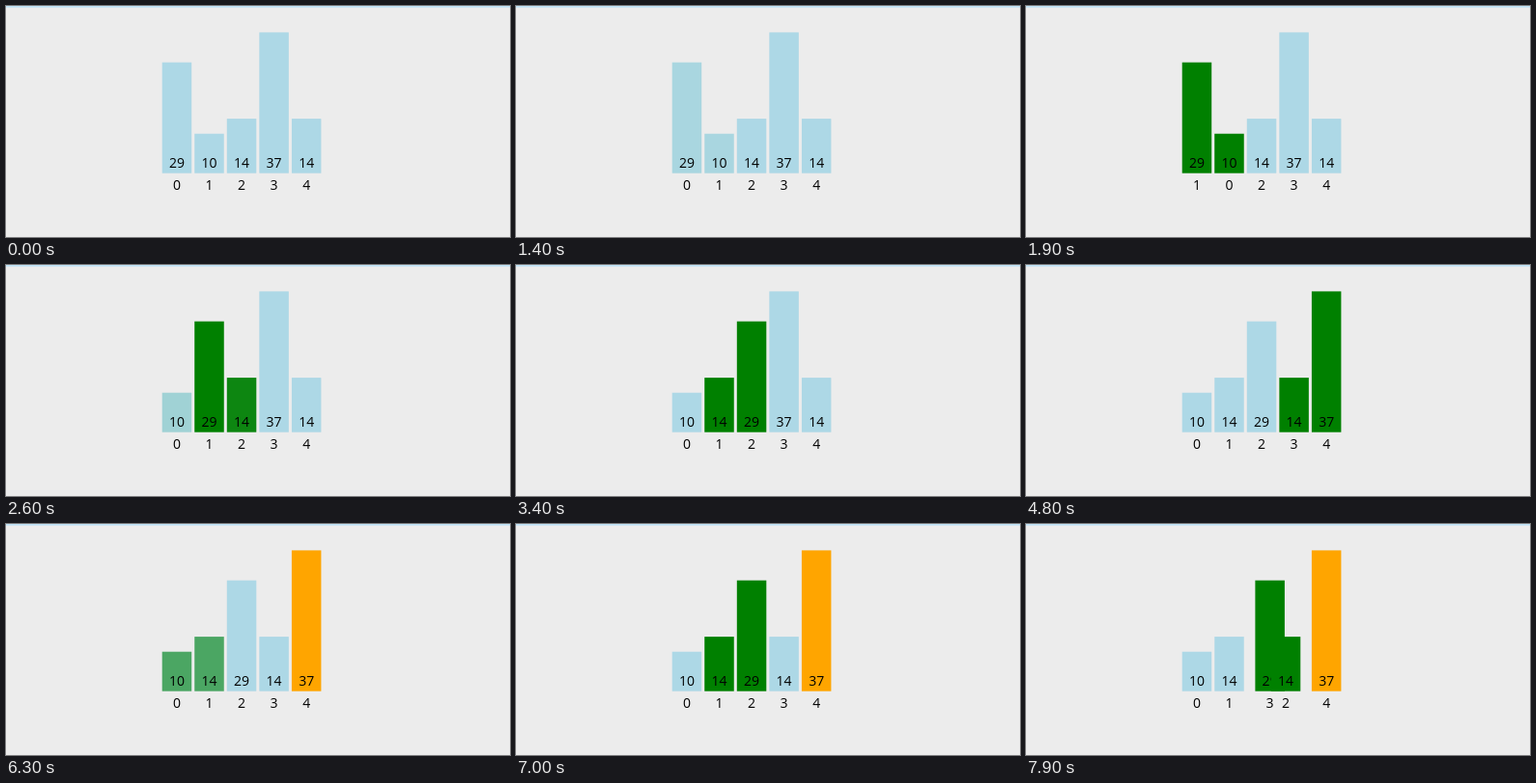
These frames come from a looping animation (522 by 240 pixels, 8 s). An HTML page:

```html
<!DOCTYPE html>
<html lang="en">
<head>
<meta charset="utf-8">
<title>Bubble sort</title>
<style>
  html, body { margin: 0; width: 100%; height: 100%; overflow: hidden; background: #ececec; }
  svg { display: block; width: 100%; height: 100%; }
  text { font: 14px "Open Sans", "Noto Sans", sans-serif; text-anchor: middle; }
</style>
</head>
<body>
<svg id="stage" viewBox="0 0 522 240">
  <rect width="522" height="240" fill="#ececec"/>
  <rect width="522" height="1.6" fill="#bfe3f7"/>
</svg>
<script>
const LOOP = 8000, FADE = 250;
const LEFT = 161.7, PITCH = 33.55, WIDTH = 30.5, BASE = 173.7;
const BLUE = [173, 216, 230], GREEN = [0, 128, 0], ORANGE = [255, 165, 0];
const values = [29, 10, 14, 37, 14];

// compare: highlight slots i and i+1; swap: exchange them; sorted: slots from i on are final
const steps = [
  { at: 1355, compare: 0 }, { at: 1890, swap: 0 },
  { at: 2417, compare: 1 }, { at: 2955, swap: 1 },
  { at: 3490, compare: 2 },
  { at: 4032, compare: 3 }, { at: 4560, swap: 3 },
  { at: 5095, sorted: 4 },
  { at: 6170, compare: 0 },
  { at: 6705, compare: 1 },
  { at: 7242, compare: 2 }, { at: 7801, swap: 2 }
];

const stage = document.getElementById("stage");

function add(parent, tag, attributes) {
  const node = document.createElementNS("http://www.w3.org/2000/svg", tag);
  for (const key in attributes) node.setAttribute(key, attributes[key]);
  return parent.appendChild(node);
}

const bars = values.map(value => {
  const group = add(stage, "g");
  const height = 3.9 * value + 2;
  const rect = add(group, "rect", { y: BASE - height, width: WIDTH, height });
  add(group, "text", { x: WIDTH / 2, y: 168.4 }).textContent = value;
  const label = add(group, "text", { x: WIDTH / 2, y: 191 });
  return { group, rect, label };
});

const mix = (a, b, p) => a + (b - a) * p;
const easeCubic = p => p < 0.5 ? 4 * p ** 3 : 1 - 4 * (1 - p) ** 3;

function render(time) {
  const order = values.map((_, i) => i);
  const slots = [...order];
  const fills = values.map(() => BLUE);
  let sortedFrom = values.length;

  for (const { at, compare, swap, sorted } of steps) {
    if (at > time) break;
    const p = easeCubic(Math.min(1, (time - at) / FADE));
    if (swap !== undefined) {
      [order[swap], order[swap + 1]] = [order[swap + 1], order[swap]];
      for (const slot of [swap, swap + 1]) {
        slots[order[slot]] = mix(slots[order[slot]], slot, p);
      }
      continue;
    }
    if (sorted !== undefined) sortedFrom = sorted;
    order.forEach((bar, slot) => {
      const active = slot === compare || slot === compare + 1;
      const goal = slot >= sortedFrom ? ORANGE : active ? GREEN : BLUE;
      fills[bar] = fills[bar].map((channel, k) => mix(channel, goal[k], p));
    });
  }

  bars.forEach(({ group, rect, label }, bar) => {
    group.setAttribute("transform", `translate(${LEFT + PITCH * slots[bar]} 0)`);
    rect.setAttribute("fill", `rgb(${fills[bar].map(Math.round)})`);
    label.textContent = order.indexOf(bar);
  });
}

function tick() {
  render(performance.now() % LOOP);
  requestAnimationFrame(tick);
}
tick();
</script>
</body>
</html>
```
